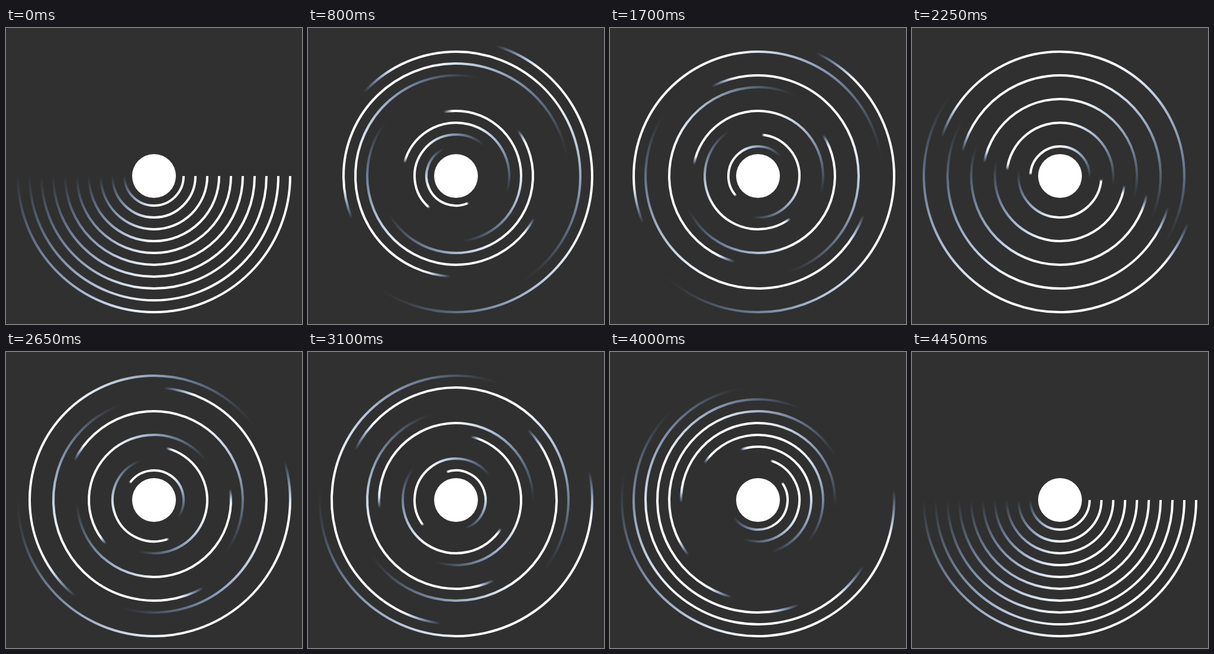
These frames come from a looping animation (500x500 px, 4.5 s). An HTML page with a canvas:

```html
<!DOCTYPE html>
<html lang="en">
<head>
<meta charset="utf-8">
<title>Orbiting arcs</title>
<style>
  html, body { margin: 0; width: 100%; height: 100%; overflow: hidden; background: #303030; }
  canvas { display: block; width: 100vw; height: 100vh; }
</style>
</head>
<body>
<canvas id="stage" width="500" height="500"></canvas>
<script>
const ctx = document.getElementById('stage').getContext('2d');
const STEP = 50, STEPS = 90, LAST = STEPS - 1;
const RINGS = 10, CENTER = 250, BG = 48;
const LEAD = 10; // degrees of gradient before the arc starts
const rad = deg => deg * Math.PI / 180;

// Area under the arc's opacity: solid for 90 degrees, then fading out over 90.
function area(x) {
  if (x <= 0) return 0;
  if (x <= 90) return x;
  if (x <= 180) return x - (x - 90) ** 2 / 180;
  return 135;
}

// Opacity at an angle along the arc, smeared over `blur` degrees.
function opacity(x, blur) {
  if (blur) return (area(x) - area(x - blur)) / blur;
  return Math.max(0, Math.min(1, (180 - x) / 90));
}

// Background to white, passing through a cool blue-grey.
function shade(a) {
  const tint = 4 * a * (1 - a);
  const mix = shift => Math.round(Math.min(255, BG + (255 - BG) * a + shift * tint));
  return `rgb(${mix(-16)},${mix(0)},${mix(24)})`;
}

function drawArc(radius, head, blur) {
  const span = 180 + blur;
  const grad = ctx.createConicGradient(rad(head - LEAD), CENTER, CENTER);
  const stop = x => grad.addColorStop((x + LEAD) / 360, shade(opacity(x, blur)));
  grad.addColorStop(0, shade(opacity(0, blur)));
  for (let x = 0; x < span; x += 4) stop(x);
  stop(span);
  ctx.strokeStyle = grad;
  ctx.beginPath();
  ctx.arc(CENTER, CENTER, radius, rad(head), rad(head + span));
  ctx.stroke();
}

function draw(time) {
  const step = Math.floor(time / STEP + 0.001) % STEPS;
  const moving = step > 0 && step < LAST;
  ctx.fillStyle = `rgb(${BG},${BG},${BG})`;
  ctx.fillRect(0, 0, 500, 500);
  ctx.lineWidth = 4;
  for (let k = 1; k <= RINGS; k++) {
    const head = (360 * k * step / LAST) % 360;
    drawArc(30 + 20 * k, head, moving ? 2 * k : 0);
  }
  ctx.fillStyle = '#fff';
  ctx.beginPath();
  ctx.arc(CENTER, CENTER, 37, 0, 2 * Math.PI);
  ctx.fill();
}

const start = performance.now();
function tick() {
  draw(performance.now() - start);
  requestAnimationFrame(tick);
}
tick();
</script>
</body>
</html>
```
